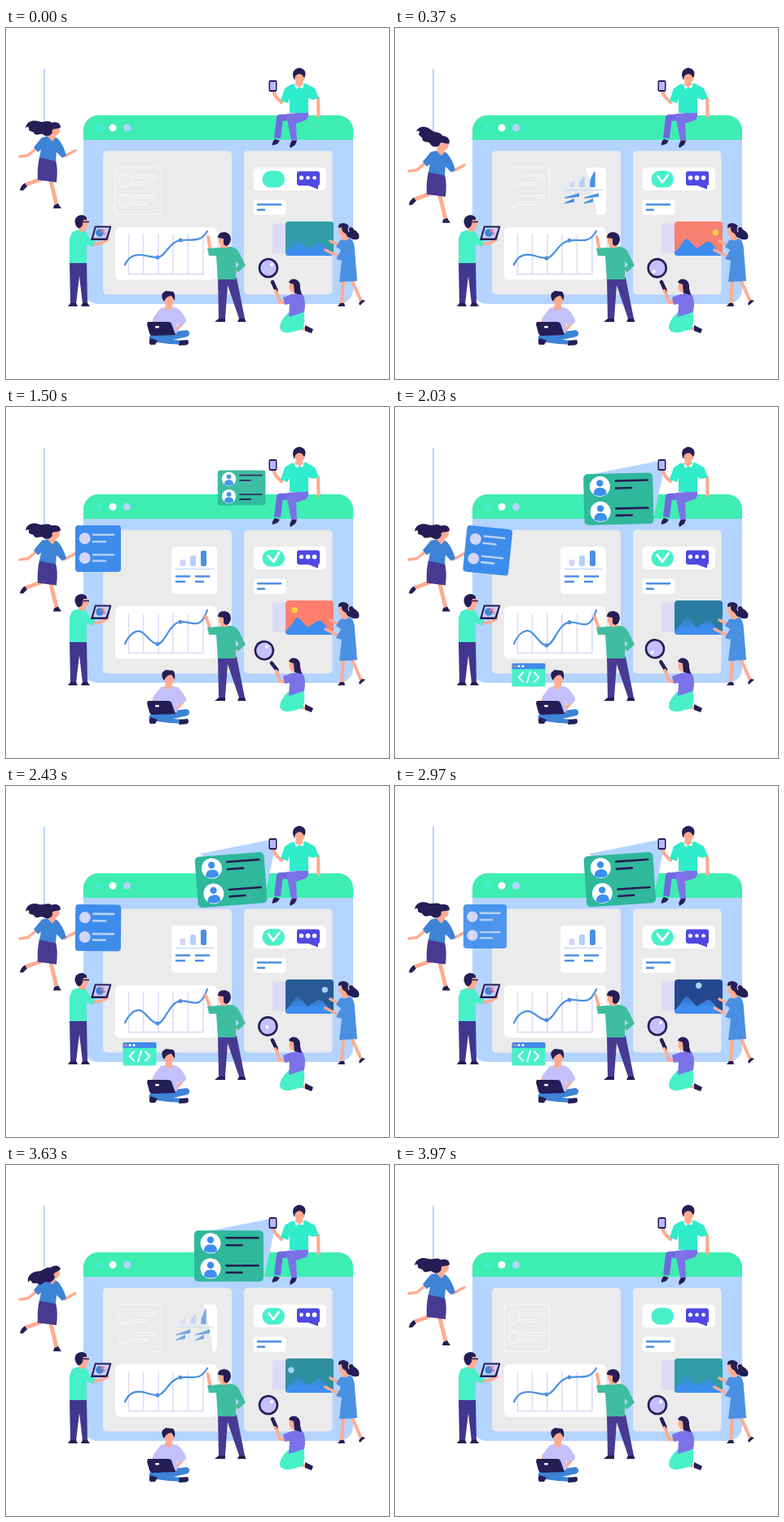
These frames come from a looping animation (470 by 430 pixels, 4010 ms). An HTML page:

```html
<!DOCTYPE html>
<html lang="en">
<head>
<meta charset="utf-8">
<title>Team building a web page</title>
<style>
html, body { margin: 0; width: 100%; height: 100%; overflow: hidden; background: #fff; }
svg { display: block; width: 470px; height: 430px; }
.navy { fill: #251d55; }
.skin { fill: #ffab91; }
.mint { fill: #48f0c9; }
.blue { fill: #3d83d6; }
.limb, .line { fill: none; stroke-linecap: round; stroke-linejoin: round; }
.limb { stroke: #ffab91; stroke-width: 4; }
.line { stroke: #4a90e2; stroke-width: 2.6; }
</style>
</head>
<body>
<svg viewBox="0 0 470 430">
  <defs>
    <clipPath id="photoClip"><rect x="343" y="237" width="59" height="42" rx="4"/></clipPath>
    <clipPath id="statsClip"><rect x="203" y="171" width="56" height="58" rx="5"/></clipPath>
    <linearGradient id="hills" x2="0" y2="1">
      <stop id="summit" offset=".1"/>
      <stop offset=".65" stop-color="#3d8ef0"/>
    </linearGradient>
    <g id="avatar">
      <circle r="12.5" fill="#fff"/>
      <circle cy="-4" r="4.200" fill="#3d8ef0"/>
      <path d="M-8 9.500Q-8 1.500 0 1.500Q8 1.500 8 9.500Q0 14-8 9.500Z" fill="#3d8ef0"/>
    </g>
  </defs>

  <!-- browser window -->
  <rect x="95" y="107" width="331" height="231" rx="18" fill="#b3d4ff"/>
  <path d="M95 137V126A19 19 0 0 1 114 107H407A19 19 0 0 1 426 126V137Z" fill="#3eedb1"/>
  <circle cx="114" cy="122.300" r="4.500" fill="#44eec9"/>
  <circle cx="131" cy="122.300" r="4.500" fill="#fff"/>
  <circle cx="148.500" cy="122.300" r="4.500" fill="#b3d4ff"/>
  <rect x="119" y="150.500" width="158" height="176" rx="5" fill="#ebebeb"/>
  <rect x="292" y="150.500" width="108.500" height="176" rx="5" fill="#ebebeb"/>

  <!-- profile card outline -->
  <g id="ghost" transform="translate(134 171)" fill="none" stroke="#f8f8fd" stroke-width="1.200">
    <rect width="56" height="57.500" rx="5" pathLength="1"/>
    <circle cx="12" cy="16" r="7.300" pathLength="1"/>
    <circle cx="12" cy="40.500" r="7.300" pathLength="1"/>
    <path d="M21 10H49V13H21ZM21 18.500H38V21.500H21Z" pathLength="1"/>
    <path d="M21 34.500H49V37.500H21ZM21 42.500H38V45.500H21Z" pathLength="1"/>
  </g>

  <!-- statistics card -->
  <g clip-path="url(#statsClip)">
    <path id="statsBack" fill="#fff"/>
    <g id="stats"></g>
  </g>

  <!-- chart -->
  <rect x="134" y="244" width="125" height="64.500" rx="6" fill="#fff"/>
  <path d="M150.500 253V302M168.500 253V302M187 253V302M205 253V302M223.500 253V302M242 253V302M150 301.500H242" stroke="#dadaf6" stroke-width="1.500"/>
  <path id="curve" class="line" style="stroke-width:2.200"/>
  <circle id="low" cx="186" r="2.500" fill="#4a90e2"/>
  <circle id="high" cx="214" r="2.500" fill="#4a90e2"/>

  <!-- right column -->
  <rect x="303.500" y="171" width="89.500" height="28" rx="5" fill="#fff"/>
  <rect class="mint" x="314.500" y="175" width="27.500" height="20.500" rx="10"/>
  <path id="check" class="line" d="M-6-3L-.5 4.500L6.500-4.500" style="stroke:#fff" pathLength="1"/>
  <path d="M360 175.500H382Q385 175.500 385 178.500V190Q385 193 383 193V197.500L371 193H360Q357 193 357 190V178.500Q357 175.500 360 175.500Z" fill="#4f48e2"/>
  <g id="dots" fill="#fff">
    <circle cx="362.500" cy="183.500"/><circle cx="370.500" cy="183.500"/><circle cx="378.500" cy="183.500"/>
  </g>
  <rect x="303.500" y="210.500" width="40" height="18.500" rx="4" fill="#fff"/>
  <path class="line" d="M309 216.200H337M309 222.700H317"/>
  <rect x="327" y="239.500" width="20" height="36" fill="#dcdcf6"/>
  <g clip-path="url(#photoClip)">
    <rect id="sky" x="343" y="237" width="59" height="42"/>
    <circle id="sun" r="3.700" fill="#ffd045"/>
    <circle id="moon" r="3.700" fill="#a9d0f5"/>
    <path d="M343 279V275Q350 268 355 260Q358 256 361 260L370 270L382 262.500Q386 260.500 389 264L400 277V279Z" fill="url(#hills)"/>
  </g>

  <!-- projected contact list -->
  <path id="beam" d="M324 66L238 83L317 137L331 72Z" fill="#b3d4ff"/>
  <g id="contacts">
    <rect x="-42.500" y="-31" width="85" height="62.500" rx="5" fill="#2fb89b"/>
    <use href="#avatar" x="-22.500" y="-15.500"/>
    <use href="#avatar" x="-22.500" y="15.500"/>
    <path class="line" d="M-3-22H36M-3-13H16M-3 12H36M-3 20.500H16" style="stroke:#251d55"/>
  </g>

  <!-- man with phone -->
  <g>
    <path class="limb" d="M338 91L331 84L328 77M383 86L383.500 108" style="stroke-width:4.200"/>
    <path d="M366 108.500L336 110L333 135" fill="none" stroke="#7168df" stroke-width="8" stroke-linejoin="round"/>
    <path d="M371 103L345 105Q343 109 346 117L350 138H357L356 117L368 113Q372 110 371 103Z" fill="#7b72e8"/>
    <path class="navy" d="M330 136L336 138L333 142L327 144Q326 140 330 136ZM351 138L357 138L355 143L349 147Q347 143 351 138Z"/>
    <path d="M350 69L342 74L337 89L346 92L348 86V104H371V86L377 88L384 86L379 74L368 68Z" fill="#2fecca"/>
    <path class="skin" d="M356 63H364V70L360 73L355 70Z"/>
    <path d="M354 69L360 73L366 68L364 74L360 72L356 75Z" fill="#fff"/>
    <ellipse class="skin" cx="360.500" cy="60" rx="6.200" ry="7"/>
    <path class="navy" d="M354 64Q350 56 354 51.500Q360 46 366 51.500Q369 56 366 61L363 57Q358 55 355 59Z"/>
    <rect class="navy" x="322.500" y="64" width="10" height="14" rx="2"/>
    <rect x="324" y="66" width="7" height="10" fill="#b8b5fa"/>
  </g>

  <!-- woman on the rope -->
  <path id="rope" stroke="#b3d4ff" stroke-width="2"/>
  <g id="flyer">
    <path class="limb" d="M38 147L27 156L17 157.500M72 157L85 150" style="stroke-width:3.500"/>
    <path class="limb" d="M46 184L38 187L24 192M55 187L62 216" style="stroke-width:5"/>
    <path class="navy" d="M23 190L26 194L21 199L17 199Q18 193 23 190ZM59 217L64 215L68 221H58Z"/>
    <path d="M41 158L61 162Q64 172 62 189L39 186Q38 172 41 158Z" fill="#473a92"/>
    <path class="blue" d="M44 134L54 132L63 135Q70 142 74 156L69 159L62 152L61 163L41 159L43 149L39 152L34 146Z"/>
    <path class="skin" d="M52 127H60L61 134L57 139L51 133Z"/>
    <ellipse class="skin" cx="60" cy="124.500" rx="6" ry="7.500"/>
    <path id="hair" class="navy" d="M67 122C67 115 60 115 56 116C51 112 45 117 40 114.500C34 112.500 25 114 24 123C27 120 29 122 28 125C30 128 34 126 35 130C39 133 43 128 46 131C50 134 55 132 57 128C55 122 61 125 67 122Z"/>
  </g>

  <g id="card">
    <rect x="-28" y="-28.500" width="56" height="57" rx="4" fill="#3d8cec"/>
    <circle cx="-16.300" cy="-12.500" r="7" fill="#d3d6fb"/>
    <circle cx="-16.300" cy="11.500" r="7" fill="#d3d6fb"/>
    <path class="line" d="M-6-17H19M-6-8.500H9M-6 7.500H19M-6 15H9" style="stroke:#b4d0fc"/>
  </g>

  <!-- man with tablet -->
  <g>
    <path d="M78 286H99L100 338H94L90 304L86 338H79Z" fill="#3f3690"/>
    <path class="navy" d="M79 337H86L88 341H76ZM94 337H100L103 341H92Z"/>
    <path class="mint" d="M81 250Q91 245 98 249L103 258L110 262L107 268L99 265V288H78V258Z"/>
    <path class="skin" d="M90 241H98V248Q93 252 89 247Z"/>
    <ellipse class="skin" cx="95" cy="239" rx="6" ry="7"/>
    <path class="navy" d="M88 245Q82 238 86 232Q93 226 99 232L99 235H95L94 241Q92 246 88 245Z"/>
    <path d="M95 237.500H102" stroke="#251d55" stroke-width="1.500"/>
    <path class="limb" d="M109 265L118 263L125 259" style="stroke-width:3.500"/>
    <path class="navy" d="M109 242.500H128Q130 242.500 129 244.500L125 258.500Q124 260 122 260H104Z"/>
    <path d="M110.500 244.500H127L122.500 257.500H107Z" fill="#c5d3fb"/>
    <circle cx="115" cy="251" r="4.800" fill="#3d83d6"/>
    <path d="M115 251L118 246L122 248ZM118 252L123 250L121 254Z" fill="#ff6f8a"/>
  </g>

  <!-- man at the chart -->
  <g>
    <path class="limb" id="forearm" d="M250.500 270L248 256"/>
    <path d="M260 306H283L293 356H286L272 315L269 356H261Z" fill="#473a92"/>
    <path class="navy" d="M261 356H269V360H256ZM286 356H293L294.500 360H284Z"/>
    <path class="limb" d="M284 296L279 300"/>
    <path d="M247 270L261 269L276 268Q284 269 287 277L294 291L285 299L281 295L286 290L282 286V308H260L258 279L249 279Z" fill="#3fbda0"/>
    <path class="skin" d="M264 262H272V268Q268 271 263 268Z"/>
    <ellipse class="skin" cx="266.500" cy="260" rx="5.700" ry="7"/>
    <path class="navy" d="M260 257Q260 250 268 250Q276 251 276 259Q275 266 270 267L267 265V258Z"/>
  </g>

  <g id="code">
    <rect class="mint" x="-20.500" y="-14.500" width="41" height="28.500" rx="2"/>
    <path d="M-20.500-7.500V-12.500Q-20.500-14.500-18.500-14.500H18.500Q20.500-14.500 20.500-12.500V-7.500Z" fill="#438bea"/>
    <circle cx="-17" cy="-11" r="1.500" fill="#ff7f8e"/>
    <circle cx="-12" cy="-11" r="1.500" fill="#fff"/>
    <circle cx="-7" cy="-11" r="1.500" fill="#fff"/>
    <path class="line" d="M-7-3L-12.500 2.500L-7 8M7-3L12.500 2.500L7 8M2-4L-2 9" style="stroke:#fff;stroke-width:2"/>
  </g>

  <!-- sitting coder -->
  <g>
    <path class="blue" d="M179 375L199 373L222 370Q228 373 223 378L205 382L221 383L219 388L200 387L177 384Q173 379 179 375Z"/>
    <path class="navy" d="M178 380L186 383L183 388H177Q174 384 178 380ZM213 383L223 382Q226 387 221 388.500L212 389Z"/>
    <path class="limb" d="M184 354L181 361M217 361L209 370L204 372"/>
    <path d="M190 343Q200 340 210 343Q216 347 221 357Q222 361 218 362L211 365L210 360V374H191V360L183 361L180 356Z" fill="#c3c0fb"/>
    <path class="skin" d="M196 338H204V343Q200 349 195 343Z"/>
    <ellipse class="skin" cx="200" cy="333" rx="6" ry="7.500"/>
    <path class="navy" d="M194 335Q190 330 192 325L196 322L205 323Q208 325 207 334L203 328Q197 328 194 335Z"/>
    <path class="navy" d="M174 360H199Q202 360 203 362L208 376L180 377Q177 377 176 374L173 363Z"/>
    <rect x="183" y="365" width="5" height="2.500" rx="1.200" fill="#fff"/>
  </g>

  <!-- kneeling woman with magnifier -->
  <g>
    <path class="limb" d="M358 367L370 369M343 336L336 336L332 323"/>
    <path class="navy" d="M367 364L377 369L375 374L367 371Z"/>
    <path class="mint" d="M346 349L365 345Q368 358 364 369L348 373Q337 374 336 367Q336 359 346 349Z"/>
    <path d="M340 330L351 326L363 325Q369 332 366 348L347 354L348 338L342 339Z" fill="#7b72e8"/>
    <ellipse class="skin" cx="352.500" cy="317" rx="5" ry="7"/>
    <path class="navy" d="M347 312Q349 306 356 308Q362 311 361 319L363 327L354 325L353 314Z"/>
    <g id="glass">
      <path d="M327 311L331.500 321" stroke="#251d55" stroke-width="4.500" stroke-linecap="round"/>
      <circle cx="322" cy="294" r="11" fill="#c3c0fb" stroke="#251d55" stroke-width="2.600"/>
      <circle id="glint" r="2" fill="#fff"/>
      <circle class="skin" cx="330.500" cy="322" r="2"/>
    </g>
  </g>

  <!-- woman at the picture -->
  <g>
    <path class="limb" d="M408 266L398 261M410 281L400 276L392 272" style="stroke-width:3.500"/>
    <path class="limb" d="M414 308L412 338M424 308L436 335"/>
    <path class="navy" d="M410 337H415L416 341H407ZM433 337L437 333L441 334L434 340Z"/>
    <path d="M410 260L422 258Q428 261 428 273L431 310L409 311L412 285L405 283L411 272L405 268Z" fill="#4a90e2"/>
    <path class="skin" d="M412 252H420V259Q415 262 412 258Z"/>
    <ellipse class="skin" cx="414" cy="249" rx="5.500" ry="7"/>
    <path class="navy" d="M408 245Q407 239 414 239Q421 240 421 245Q425 242 427 247Q435 251 433 258Q428 261 422 257Q419 257 417 252Q411 249 412 244Z"/>
    <path d="M421 243.500Q419 247 421 250" fill="none" stroke="#fff"/>
  </g>
</svg>
<script>
const LOOP = 4010;
const $ = id => document.getElementById(id);
const set = (id, attrs) => Object.entries(attrs).forEach(([k, v]) => $(id).setAttribute(k, v));
const mix = (a, b, k) => Array.isArray(a) ? a.map((v, i) => mix(v, b[i], k)) : a + (b - a) * k;
const ease = x => x * x * (3 - 2 * x);
const rgb = color => `rgb(${color.map(Math.round)})`;

// Eased value at time t from pairs of [time, value]
function key(t, ...keys) {
  const i = keys.findIndex(k => k[0] > t);
  if (i === 0) return keys[0][1];
  if (i < 0) return keys[keys.length - 1][1];
  const [t0, a] = keys[i - 1], [t1, b] = keys[i];
  return mix(a, b, ease((t - t0) / (t1 - t0)));
}

// Smooth rise and fall between two times
const hump = (t, from, to) => t > from && t < to ? Math.sin(Math.PI * (t - from) / (to - from)) ** 2 : 0;

const TEAL = [47, 156, 166], CORAL = [255, 127, 110], DUSK = [43, 124, 163], NIGHT = [37, 71, 143], HILL = [61, 142, 240];
const BARS = [[217, 187, '#d5d3fa'], [229.5, 182, '#b3d0fb'], [242.5, 176, '#4a90e2']];
const LABELS = [[208, 207.5, 18], [232, 207.5, 18], [208, 214, 12], [232, 214, 11]];

function drawStats(p) {
  const left = 259 - 56 * p, foot = 259 - 56 * p * p;
  set('statsBack', { d: `M259 171V229H${foot}Q${mix(left, foot, .7)} 200 ${left} 171Z` });
  const bars = BARS.map(([x, top, fill]) => {
    const half = mix(3, 1.5, p), base = 195 - 2 * p, peak = top + 2 * p;
    return `<path d="M${x - half} ${base}H${x + half}V${peak}L${x - half} ${mix(base, peak, p)}Z" fill="${fill}" stroke="${fill}" stroke-width="${4 * p}" stroke-linejoin="round"/>`;
  });
  const labels = LABELS.map(([x, y, w]) => {
    const lift = 7 * (1 - p);
    return `<path d="M${x} ${y + 1.3}L${x + w} ${y + 1.3 - lift / 2}V${y - 1.3 - lift}L${x} ${y + mix(1, -1.3, p)}Z" fill="#4a90e2"/>`;
  });
  $('stats').innerHTML = bars.join('') + labels.join('') + '<path d="M208 198.500H255" stroke="#c5dcfa" stroke-width="1.500"/>';
  $('stats').style.opacity = Math.min(1, p * 2.5);
}

function drawChart(t) {
  const d = 11 * hump(t, 0, LOOP), peak = 278 - .35 * d, high = 260 + .35 * d;
  set('curve', { d: `M146 290C149 283 155 ${peak} 163 ${peak}S177 ${281 + d} 186 ${281 + d}S200 ${262 + .3 * d} 214 ${high}S238 ${264 + 1.2 * d} 247 249` });
  set('low', { cy: 281 + d });
  set('high', { cy: high });
  set('forearm', { transform: `rotate(${-d} 250 273)` });
}

function drawFlyer(t) {
  const drop = s => key(s, [0, 0], [650, 29.5], [3225, 29.5], [3825, 0]);
  const y = drop(t), speed = drop(t + 15) - drop(t - 15);
  set('flyer', { transform: `translate(0 ${y})` });
  set('rope', { d: `M47 50V${118 + y}` });
  set('hair', { transform: `rotate(${speed * 10 + 2 * Math.sin(t * Math.PI * 6 / LOOP)} 62 121)` });
}

function drawCard(t) {
  const [x, y, size] = key(t, [650, [162, 200, 1]], [1150, [113, 173.5, 1]], [2800, [113, 173.5, 1]],
    [2970, [110.5, 172, .95]], [3400, [162, 200, 1]]);
  const tilt = 5.8 * hump(t, 1550, 2520);
  set('card', {
    transform: `translate(${x + tilt / 8} ${y + tilt / 2.5}) rotate(${tilt}) scale(${size})`,
    opacity: key(t, [600, 0], [900, 1], [2800, 1], [2970, .9], [3400, 0])
  });
  const drawn = key(t, [0, 1], [650, 0], [3300, 0], [3930, 1]);
  set('ghost', { 'stroke-dasharray': `${drawn} 1`, opacity: Math.min(1, drawn * 5) });
}

function drawContacts(t) {
  const size = key(t, [1230, 0], [1660, 1], [3650, 1], [3920, 0]);
  const tilt = 5 * hump(t, 1700, 3630);
  set('contacts', {
    transform: `translate(${324 - 50.5 * size + .6 * tilt} ${71 + 40.3 * size + .8 * tilt}) rotate(${-tilt}) scale(${size})`,
    opacity: mix(.75, 1, size)
  });
  set('beam', { opacity: key(t, [1510, 0], [1750, 1], [3650, 1], [3820, 0]) });
}

function drawPhoto(t) {
  const sky = key(t, [0, TEAL], [420, CORAL], [1610, CORAL], [2030, DUSK], [2700, NIGHT], [3100, NIGHT], [3650, [46, 143, 158]], [LOOP, TEAL]);
  const haze = key(t, [0, .7], [370, 0], [1610, 0], [2030, .7], [2970, .35], [3630, .7]);
  set('sky', { fill: rgb(sky) });
  set('summit', { 'stop-color': rgb(mix(HILL, sky, haze)) });
  for (const [id, start] of [['sun', 0], ['moon', 2005]]) {
    const dx = 34 - .0345 * (t - start);
    set(id, { cx: 372 + dx, cy: 244.5 + .0137 * dx * dx });
  }
}

function drawTools(t) {
  const size = key(t, [1530, 0], [1950, 1], [3240, 1], [3560, 0]);
  set('code', { transform: `translate(${190 - 26 * size} ${362 - 33.5 * size}) scale(${size})` });
  set('glass', { transform: `rotate(${-14 * hump(t, 200, 2700)} 337 317)` });
  const g = 4 * key(t, [0, 1], [370, -1], [1500, 1], [2030, -1], [2970, 1]);
  set('glint', { cx: 322 + g, cy: 294 - g });
}

function drawBadges(t) {
  const size = key(t, [500, 1], [1300, 1.12], [2900, 1.1], [3500, 1]);
  const drawn = key(t, [0, 0], [340, 1], [3660, 1], [3950, 0]);
  set('check', {
    transform: `translate(328.500 184.500) rotate(${-8 * hump(t, 900, 2100)}) scale(${size})`,
    'stroke-dasharray': `${drawn} 1`, opacity: Math.min(1, drawn * 8)
  });
  [...$('dots').children].forEach((dot, i) =>
    dot.setAttribute('r', 2.6 + .3 * Math.sin(t * Math.PI * 8 / LOOP - i)));
}

function frame() {
  const t = performance.now() % LOOP;
  drawStats(key(t, [0, 0], [800, 1], [3150, 1], [3900, 0]));
  [drawChart, drawFlyer, drawCard, drawContacts, drawPhoto, drawTools, drawBadges].forEach(draw => draw(t));
  requestAnimationFrame(frame);
}
frame();
</script>
</body>
</html>
```
